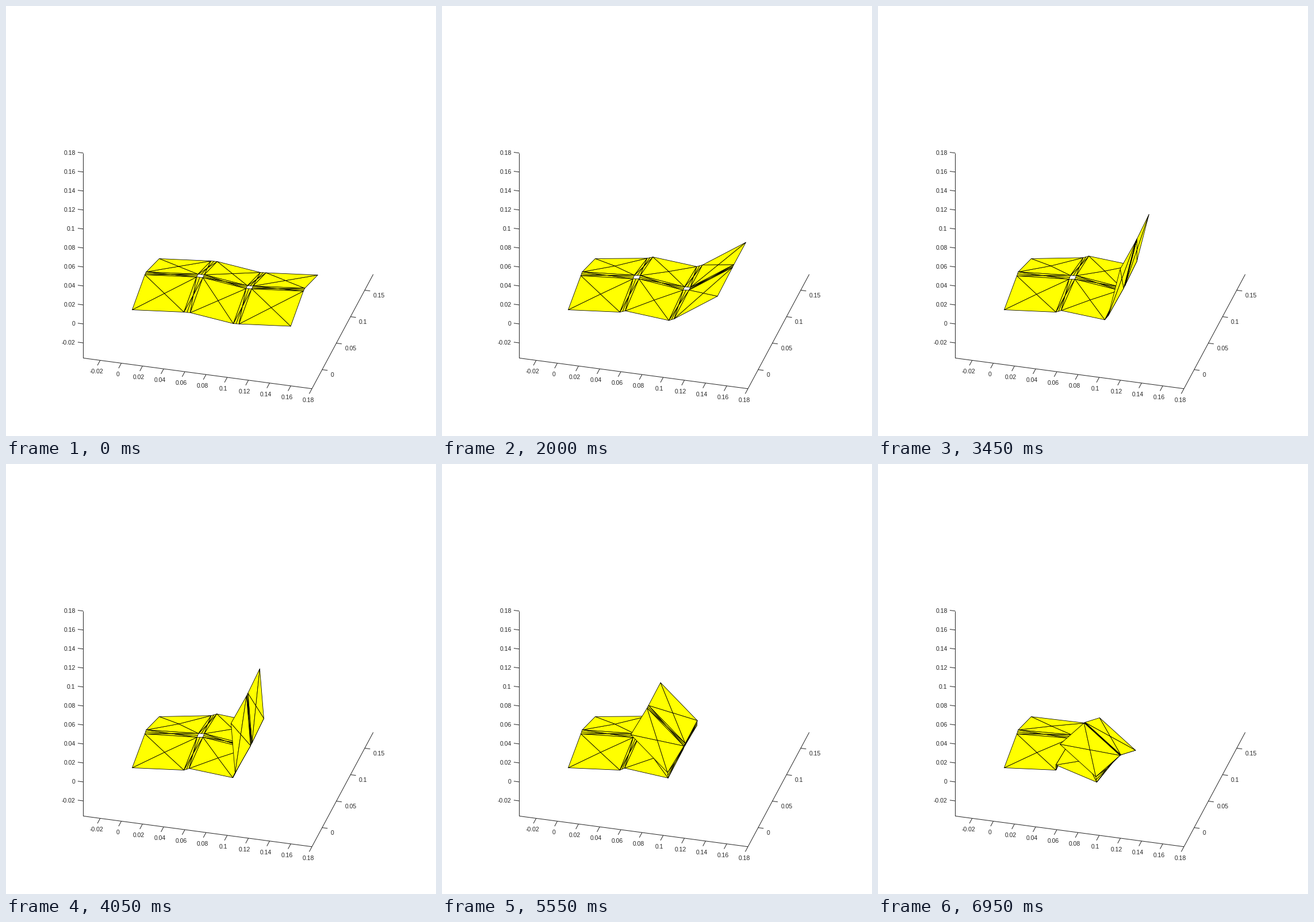
Write a matplotlib script that moves like this. It is 748 px wide and 748 px high and loops after 7 s.

```python
import numpy as np
import matplotlib.pyplot as plt
from matplotlib.animation import FuncAnimation
from matplotlib.collections import LineCollection, PolyCollection

SIZE, FRAMES, HOLD = 748, 140, 9
INK = "#262626"
PX = 0.72  # one pixel in points at 100 dpi

# Orthographic view: azimuth 15, elevation 30
SCALE = 1907
AZ, EL = np.radians([15, 30])
ORIGIN = np.array([217.9, 528.2])
AXES = SCALE * np.array([
    [np.cos(AZ), np.sin(AZ) * np.sin(EL)],
    [np.sin(AZ), -np.cos(AZ) * np.sin(EL)],
    [0, -np.cos(EL)],
])
LO, HI = -0.036, 0.18


def project(x, y, z):
    return ORIGIN + np.array([x, y, z]) @ AXES


def vec(x, y):
    return np.array([x, y], float)


def swing(deg):
    """Screen vector of a panel's width turned up by an angle."""
    t = np.radians(deg)
    return np.cos(t) * vec(90, 9) + np.sin(t) * vec(0, -86)


# Depth profile of the two rows: at rest, change by settling, by tipping
CORNER = vec(219, 528)
DEPTH = np.array([[0, 0], [22, -61], [24.5, -66], [47, -89]])
FLATTEN = np.array([[0, 0], [5, 12], [5, 14], [3, 0]])
TIP = np.array([[0, 0], [15, 10], [14, 14], [19, 43]])


def sheet_grid(step):
    """Corners as [line across, line in depth, xy]."""
    settle = 1 - np.exp(-step / 20)
    tip = (max(0, step - 90) / 40) ** 2
    fold = 3 + 6 * np.log1p(np.exp((step - 11) / 4)) - 40 * tip

    # Along the front edge: panel, crease, panel, crease, panel
    across = np.array([
        vec(0, 0),
        vec(90, 4),
        vec(11, 1) + settle * vec(-2, -4) + tip * vec(-9, -6),
        vec(75, 19) + settle * vec(1, -3) + tip * vec(-5, 14),
        swing(0.7 * fold) * 0.11,
        swing(fold) + tip * vec(8, 4),
    ]).cumsum(axis=0)

    # The row ridge flattens more and more towards the folding column
    line = np.minimum(np.arange(6), 4)[:, None, None]
    weight = (line / 4) ** 1.3
    depth = DEPTH + weight * (settle * FLATTEN + tip * TIP)
    depth[:, 1, 1] += 2 * settle
    depth[1:, 3, 1] -= 6 * (settle - tip)
    return CORNER + across[:, None] + depth


def panel_faces(a, b, c, d):
    m = (a + b + c + d) / 4
    return [(a, b, m), (b, d, m), (d, c, m), (c, a, m)]


def crease_faces(p0, p1, q0, q1):
    """Strip between edges p and q with three nodes on its midline."""
    e0, e1 = (p0 + q0) / 2, (p1 + q1) / 2
    m = (e0 + e1) / 2
    return [(p0, e0, m), (p0, p1, m), (p1, e1, m),
            (q0, e0, m), (q0, q1, m), (q1, e1, m)]


def sheet_faces(step):
    g = sheet_grid(step)
    faces = []
    for i in (0, 2, 4):
        l, r = g[i], g[i + 1]
        if i:
            for j in (2, 0):
                faces += crease_faces(g[i - 1, j], g[i - 1, j + 1],
                                      l[j], l[j + 1])
        faces += panel_faces(l[2], r[2], l[3], r[3])
        faces += crease_faces(l[1], r[1], l[2], r[2])
        faces += panel_faces(l[0], r[0], l[1], r[1])
    return faces


fig = plt.figure(figsize=(7.48, 7.48), dpi=100, facecolor="white")
ax = fig.add_axes([0, 0, 1, 1])
ax.set_xlim(-0.5, SIZE - 0.5)
ax.set_ylim(SIZE - 0.5, -0.5)
ax.axis("off")

lines = [
    (project(LO, LO, LO), project(LO, LO, HI)),
    (project(LO, LO, LO), project(HI, LO, LO)),
    (project(HI, LO, LO), project(HI, HI, LO)),
]


def tick(pos, value, mark, shift, align):
    lines.append((pos, pos + mark))
    x, y = pos + shift
    ax.text(x, y + 3.7, f"{value:g}", ha=align, va="baseline", color=INK,
            fontsize=10.5 * PX, family="Liberation Sans")


for n in range(-1, 10):
    v = n / 50
    tick(project(v, LO, LO), v, (-4.7, 8.8), (-6.5, 19.3), "center")
    tick(project(LO, LO, v), v, (-9.4, -1.2), (-13.8, -0.9), "right")
for n in range(4):
    v = n / 20
    tick(project(HI, v, LO), v, (9.4, 1.2), (14.5, 9), "left")

ax.add_collection(LineCollection(lines, colors=INK, linewidths=PX),
                  autolim=False)
sheet = PolyCollection(sheet_faces(0), facecolors="#ffff00",
                       edgecolors="black", linewidths=0.8 * PX,
                       joinstyle="round")
ax.add_collection(sheet, autolim=False)


def update(frame):
    sheet.set_verts(sheet_faces(max(0, frame - HOLD)))
    return [sheet]


anim = FuncAnimation(fig, update, frames=FRAMES, interval=50,
                     repeat=True, repeat_delay=0, blit=False)
plt.show()
```
